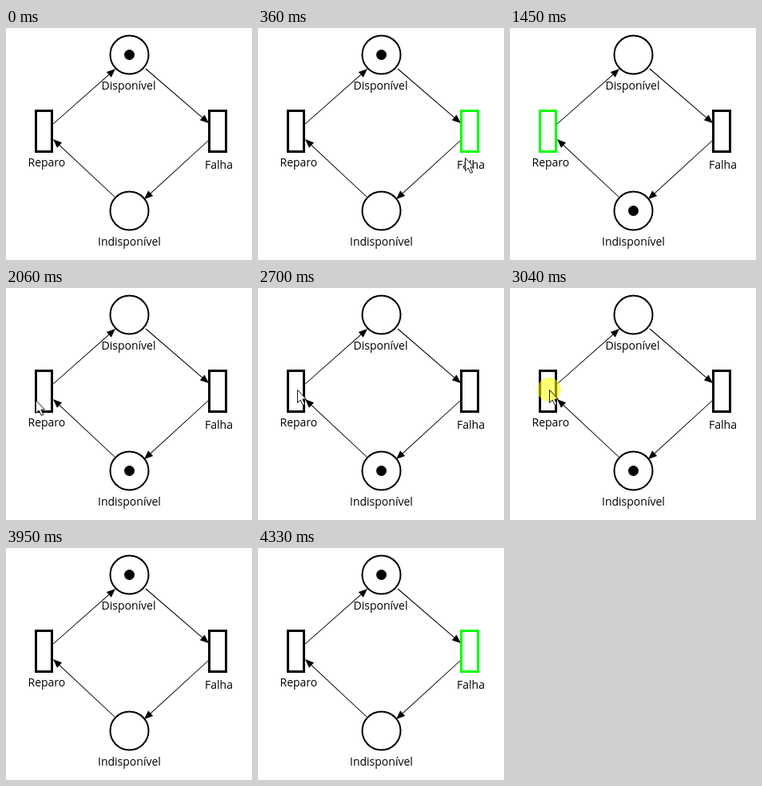
Write an HTML page with a canvas that moves like this. It is 308x290 px and loops after 4.56 s.

```html
<!DOCTYPE html>
<html lang="pt">
<head>
<meta charset="utf-8">
<style>
html, body { margin: 0; width: 100%; height: 100%; overflow: hidden; background: #fff; }
canvas { display: block; width: 308px; height: 290px; }
</style>
</head>
<body>
<canvas id="stage"></canvas>
<script>
const LOOP = 4560, W = 308, H = 290;
const TICK = 75, CLICK = 70, EXIT = 80;
const FAIL = 1060, REPAIR = 3090; // moments at which the token moves

const canvas = document.getElementById('stage');
const ctx = canvas.getContext('2d');
const scale = window.devicePixelRatio || 1;
canvas.width = W * scale;
canvas.height = H * scale;
ctx.scale(scale, scale);

// The pointer curves in through a bend, rests, then hops away and is gone.
const visits = [
  { start: 70, steps: 7, from: [286, 277], bend: [246, 138], rest: [263, 132], leave: 1370, hop: [-12, 70] },
  { start: 1830, steps: 6, from: [36, 238], bend: [32, 98], rest: [49, 127], leave: 3320, hop: [-2, 46] }
];
const clicks = [990, 2770, 3020];

const blink = (t, since, half) => Math.floor((t - since) / half) % 2 === 1;

function failLit(t) {
  if (t < FAIL) return blink(t, -180, 390);
  return t >= REPAIR && blink(t, 3160, 390);
}

const repairLit = t => t >= FAIL && t < REPAIR && blink(t, 1045, 405);

function pointerAt(t) {
  const v = visits.find(v => t >= v.start && t < v.leave + EXIT);
  if (!v) return null;
  if (t >= v.leave) return v.rest.map((c, i) => c + v.hop[i]);
  const step = Math.floor((t - v.start + 10) / TICK);
  const p = Math.min(1, step / v.steps), q = 1 - p;
  return v.rest.map((c, i) =>
    Math.round(q * q * v.from[i] + 2 * p * q * v.bend[i] + p * p * c));
}

function disc(x, y, r, color) {
  ctx.fillStyle = color;
  ctx.beginPath();
  ctx.arc(x, y, r, 0, Math.PI * 2);
  ctx.fill();
}

function place(y, marked) {
  ctx.strokeStyle = '#000';
  ctx.lineWidth = 2;
  ctx.beginPath();
  ctx.arc(154.5, y, 24, 0, Math.PI * 2);
  ctx.stroke();
  if (marked) disc(154.5, y, 6.5, '#000');
}

function transition(x, width, lit) {
  const line = 3;
  ctx.strokeStyle = lit ? '#0f0' : '#000';
  ctx.lineWidth = line;
  ctx.strokeRect(x + line / 2, 102 + line / 2, width - line, 54 - line);
}

function arrow(x1, y1, x2, y2) {
  const len = 11, half = 4.5;
  ctx.save();
  ctx.translate(x2, y2);
  ctx.rotate(Math.atan2(y2 - y1, x2 - x1));
  ctx.strokeStyle = ctx.fillStyle = '#000';
  ctx.lineWidth = 1;
  ctx.beginPath();
  ctx.moveTo(-Math.hypot(x2 - x1, y2 - y1), 0);
  ctx.lineTo(-len, 0);
  ctx.stroke();
  ctx.beginPath();
  ctx.moveTo(0, 0);
  ctx.lineTo(-len, -half);
  ctx.lineTo(-len, half);
  ctx.fill();
  ctx.restore();
}

function label(text, x, y) {
  ctx.font = '14px "Open Sans", "Noto Sans", sans-serif';
  ctx.fillStyle = '#000';
  ctx.fillText(text, x, y);
}

const shape = new Path2D('M.5 .5V16.5L4.2 13L7.2 19.4L9.7 18.3L6.9 12H11.4Z');

// The click glow tints the body of the pointer but not its outline.
function drawPointer(x, y, clicked) {
  ctx.save();
  ctx.translate(x, y);
  ctx.fillStyle = '#fff';
  ctx.fill(shape);
  if (clicked) disc(0, 0, 15, 'rgba(255,255,0,.54)');
  ctx.strokeStyle = '#111';
  ctx.lineWidth = 1;
  ctx.stroke(shape);
  ctx.restore();
}

function draw(t) {
  ctx.fillStyle = '#fff';
  ctx.fillRect(0, 0, W, H);

  arrow(175, 51, 254, 119);
  arrow(253, 141, 173, 214);
  arrow(136, 211, 59, 139);
  arrow(59, 120, 137, 51);

  const failed = t >= FAIL && t < REPAIR;
  place(33.5, !failed);
  place(228.5, failed);
  transition(36, 23, repairLit(t));
  transition(253, 24, failLit(t));

  label('Disponível', 119.5, 77);
  label('Indisponível', 115, 272);
  label('Reparo', 27.5, 173);
  label('Falha', 249, 176);

  const pos = pointerAt(t);
  if (pos) drawPointer(...pos, clicks.some(c => t >= c && t < c + CLICK));
}

function tick() {
  draw(performance.now() % LOOP);
  requestAnimationFrame(tick);
}
tick();
</script>
</body>
</html>
```
